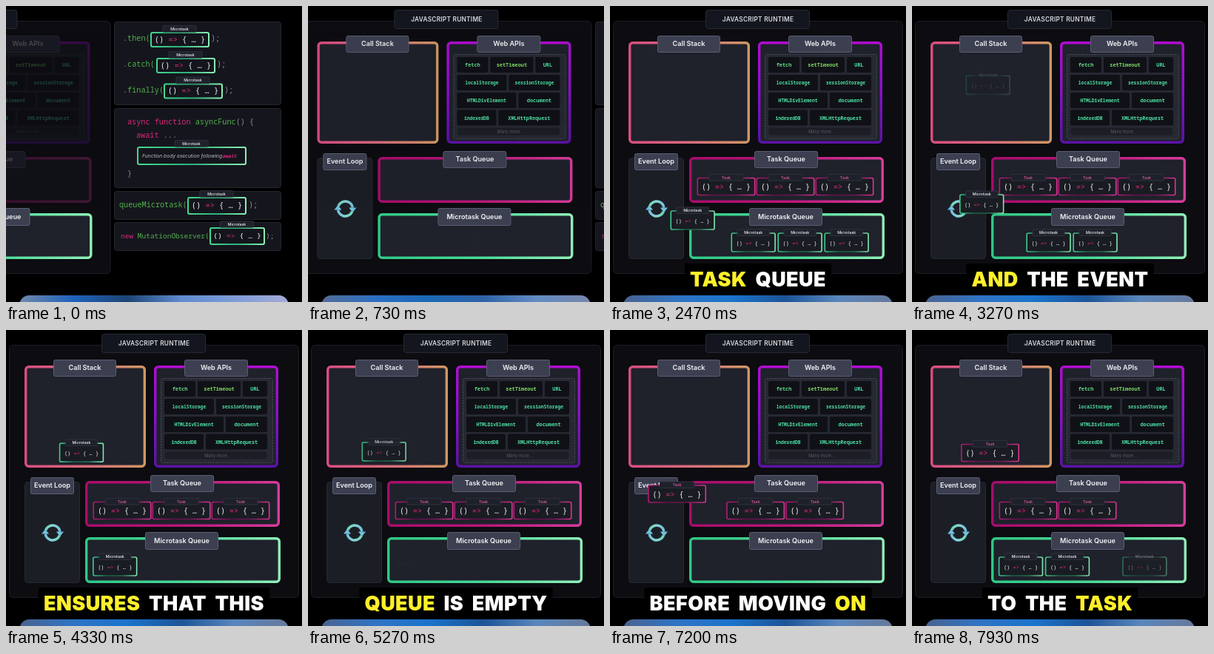
An HTML page with a canvas that plays this animation: 400x400 px, repeating every 8000 ms.

```html
<!DOCTYPE html>
<html lang="en">
<head>
<meta charset="utf-8">
<title>JavaScript runtime</title>
<style>
  html, body { margin: 0; height: 100%; overflow: hidden; background: #000; }
  canvas { display: block; width: 400px; height: 400px; }
</style>
</head>
<body>
<canvas id="stage"></canvas>
<script>
const canvas = document.getElementById('stage');
const ctx = canvas.getContext('2d');
const ratio = window.devicePixelRatio || 1;
canvas.width = canvas.height = 400 * ratio;

const LOOP = 8000;
const SANS = 'Inter, sans-serif';
const MONO = '"Noto Sans Mono", monospace';
const PINK = '#d8277c', GREEN = '#45d890', CODE = '#52b04c', WHITE = '#f2f3f5', GREY = '#8b8d94';

const clamp = v => Math.max(0, Math.min(1, v));
const phase = (t, start, length) => clamp((t - start) / length);
const ease = u => u < .5 ? 4 * u ** 3 : 1 - (2 - 2 * u) ** 3 / 2;
const lerp = (a, b, u) => a + (b - a) * u;
const bezier = (a, b, c, d, u) => {
  const v = 1 - u;
  return a * v ** 3 + 3 * b * v * v * u + 3 * c * v * u * u + d * u ** 3;
};

function gradient(x0, y0, x1, y1, colors) {
  const g = ctx.createLinearGradient(x0, y0, x1, y1);
  colors.forEach((c, i) => g.addColorStop(i / (colors.length - 1), c));
  return g;
}
const across = (x0, x1, colors) => gradient(x0, 0, x1, 0, colors);

// Rounded box given by its outer edges.
function box(x0, y0, x1, y1, fill, stroke, line = 1, radius = 3) {
  ctx.beginPath();
  ctx.roundRect(x0 + line / 2, y0 + line / 2, x1 - x0 - line, y1 - y0 - line, radius);
  ctx.fillStyle = fill;
  ctx.fill();
  if (!stroke) return;
  ctx.strokeStyle = stroke;
  ctx.lineWidth = line;
  ctx.stroke();
}

function text(str, x, y, font, color, align = 'center', spacing = 0) {
  ctx.font = font;
  ctx.letterSpacing = spacing + 'px';
  ctx.fillStyle = color;
  ctx.textAlign = align;
  ctx.textBaseline = 'alphabetic';
  ctx.fillText(str, x, y);
}

// Consecutive pieces of [text, color] on one line.
function runs(x, y, font, pieces) {
  for (const [str, color] of pieces) {
    text(str, x, y, font, color, 'left');
    x += ctx.measureText(str).width;
  }
}

function label(str, x0, y0, x1, y1) {
  box(x0, y0, x1, y1, '#3c3f50', '#5a5e73', 1, 2);
  text(str, (x0 + x1) / 2, (y0 + y1) / 2 + 2.8, `600 9.1px ${SANS}`, WHITE);
}

function region(x0, y0, x1, y1, stroke) {
  box(x0, y0, x1, y1, '#1f212b', stroke, 3.4, 4);
}

function tab(str, x, y, w, size, color) {
  box(x - w / 2, y - 4.7, x + w / 2, y + 4.7, '#1e212a', '#343844', .8, 1);
  text(str, x, y + size * .36, `500 ${size}px ${SANS}`, color);
}

function arrowFunction(x, y, size) {
  const font = `500 ${size}px ${MONO}`;
  ctx.font = font;
  ctx.letterSpacing = '0px';
  runs(x - ctx.measureText('() => { … }').width / 2, y + size * .33, font,
    [['() ', WHITE], ['=>', PINK], [' { … }', WHITE]]);
}

function card(kind, x, y, alpha = 1) {
  if (alpha <= 0) return;
  const task = kind === 'Task';
  const w = task ? 39.5 : 30.2, h = task ? 12.3 : 13.3;
  const colors = task
    ? ['#b41c76', '#5c1248', '#6e1654', '#de3596']
    : ['#3fd090', '#1c5a44', '#22694e', '#84ecb2'];
  ctx.save();
  ctx.globalAlpha = alpha;
  box(x - w, y - h, x + w, y + h, '#1a1c23', across(x - w, x + w, colors), 1.6, 2);
  tab(kind, x, y - h, task ? 47 : 44, 5.3, task ? '#e65aa4' : WHITE);
  arrowFunction(x, y + 1, task ? 10 : 7);
  ctx.restore();
}

function chip(str, x0, x1, y, size, color) {
  box(x0, y, x1, y + 21, '#101117', null, 0, 2);
  text(str, (x0 + x1) / 2, y + 13, `600 ${size}px ${MONO}`, color);
}

function webApis() {
  region(200, 48, 368, 186, gradient(0, 48, 0, 186, ['#b40cd4', '#8a10cc', '#5a12a4']));
  ctx.setLineDash([2, 1.5]);
  box(209, 65, 361, 180, '#262832', '#4c4f5a', 1, 2);
  ctx.setLineDash([]);
  const teal = '#4fe0a4';
  chip('fetch', 214, 256, 69, 6.9, '#62dc86');
  chip('setTimeout', 259, 317, 69, 6.9, '#7fd864');
  chip('URL', 320, 353, 69, 6.9, teal);
  chip('localStorage', 214, 281, 93, 6.3, teal);
  chip('sessionStorage', 284, 353, 93, 6.3, teal);
  chip('HTMLDivElement', 214, 294, 117, 6.3, teal);
  chip('document', 297, 353, 117, 6.9, teal);
  chip('indexedDB', 214, 267, 140.5, 6.3, teal);
  chip('XMLHttpRequest', 270, 353, 140.5, 6.8, teal);
  box(214, 164, 353, 175, '#1c1d25');
  text('Many more...', 286, 171.6, `400 5.8px ${SANS}`, '#595b65');
  label('Web APIs', 241, 40, 327, 63);
}

function loopIcon(x, y) {
  ctx.save();
  ctx.translate(x, y);
  ctx.strokeStyle = ctx.fillStyle = across(-14, 14, ['#5fd6a8', '#86d5d4', '#6cb6e0']);
  ctx.lineWidth = 3.5;
  for (let i = 0; i < 2; i++) {
    ctx.beginPath();
    ctx.arc(0, 0, 10, Math.PI * 1.12, Math.PI * 1.95);
    ctx.stroke();
    ctx.beginPath();
    ctx.moveTo(5, -1.5);
    ctx.lineTo(15, -1.5);
    ctx.lineTo(10, 5);
    ctx.fill();
    ctx.rotate(Math.PI);
  }
  ctx.restore();
}

function runtime(dim) {
  box(4, 20, 396, 362, '#0c0c11', '#1d1e25', 1, 5);
  box(129, 5, 270, 31, '#13161e', '#262a35', 1, 3);
  text('JAVASCRIPT RUNTIME', 200, 20.6, `600 8.3px ${SANS}`, '#d6d8de', 'center', .25);
  region(25, 48, 189, 186, across(25, 189, ['#da4c80', '#d86c7c', '#cf9862']));
  label('Call Stack', 64, 40, 149, 63);
  webApis();
  box(25, 205, 100, 342, '#1c1e26', '#282a33', 1, 4);
  label('Event Loop', 33, 199, 92, 222);
  loopIcon(63, 274);
  region(107, 204, 370, 266, across(107, 370, ['#a80c6c', '#b81678', '#d83c9c']));
  label('Task Queue', 195, 196, 281, 219);
  if (dim > 0) {
    ctx.fillStyle = `rgba(12,12,17,${.74 * dim})`;
    ctx.fillRect(6, 32, 388, 238);
  }
  region(107, 280, 371, 342, across(107, 371, ['#2fc886', '#48d896', '#90f0b8']));
  label('Microtask Queue', 188, 273, 287, 297);
}

function codeBox(x0, y0, x1, y1, size) {
  box(x0, y0, x1, y1, '#14151c', across(x0, x1, [GREEN, '#2bb07a', '#8df0b4']), 2, 2);
  tab('Microtask', (x0 + x1) / 2 - .5, y0 - 4, 46, 5.2, WHITE);
  if (size) arrowFunction((x0 + x1) / 2, y0 + (y1 - y0) / 2, size);
}

// Code panels to the right of the runtime, in their on-screen position.
function codePanels() {
  const font = `400 10.2px ${MONO}`;
  for (const [top, bottom] of [[21, 134], [138, 246], [250, 289], [292, 331]])
    box(146, top, 372, bottom, '#15161d', '#24262f', 1, 3);

  const calls = [['.then(', 195, 35], ['.catch(', 203, 70], ['.finally(', 213, 104.5]];
  for (const [name, x, y] of calls) {
    text(name, 158, y + 12, font, CODE, 'left');
    codeBox(x, y, x + 80, y + 21, 10.4);
    text(');', x + 82, y + 12, font, GREY, 'left');
  }

  runs(164, 160, font, [['async function ', PINK], ['asyncFunc', CODE], ['() {', GREY]]);
  runs(176, 177.5, font, [['await', PINK], [' ...', GREY]]);
  codeBox(177, 190, 325, 215);
  text('Function body execution following', 184, 205, `italic 400 6.7px ${SANS}`, '#b9bbc2', 'left');
  text('await', 292, 205, `italic 700 6.5px ${MONO}`, PINK, 'left');
  text('}', 164, 230, font, GREY, 'left');

  text('queueMicrotask(', 153, 272, font, CODE, 'left');
  codeBox(245, 258, 325, 282, 10.4);
  text(');', 328, 272, font, GREY, 'left');

  runs(155, 314, `400 9.5px ${MONO}`, [['new ', PINK], ['MutationObserver(', CODE]]);
  codeBox(275, 299, 350, 323, 9.8);
  text(');', 351, 314, `400 9.5px ${MONO}`, GREY, 'left');
}

const dispatches = [2190, 2945, 3700, 4455];
const TRAVEL = 700;
const TASK_START = 6850;

function tasks(t) {
  const p = ease(phase(t, TASK_START, TRAVEL));
  for (let i = 2; i > 0; i--) {
    const appear = ease(phase(t, 700 + 80 * i, 260));
    card('Task', 157 + 80 * (i - p), 244, appear);
  }
  card('Task', bezier(157, 110, 45, 105.5, p), bezier(244, 240, 215, 166, p),
    ease(phase(t, 700, 260)));
}

function microtasks(t) {
  const moves = dispatches.map(start => ease(phase(t, start, TRAVEL)));
  for (let i = 3; i >= 0; i--) {
    const appear = ease(phase(t, 700 + 70 * i, 260));
    const done = phase(t, dispatches[i] + 760, 400);
    const shifted = moves.slice(0, i).reduce((a, b) => a + b, 0);
    const start = 147 + 63 * (i - shifted) + 62 * (1 - appear);
    card('Microtask', bezier(start, 103, 41, 102.7, moves[i]),
      bezier(319.5, 290, 220, 165, moves[i]) - 60 * ease(done), appear * (1 - done));
  }
  for (let i = 0; i < 3; i++) {
    const u = phase(t, 7400 + 200 * i, 300);
    card('Microtask', 147 + 63 * i + 62 * (1 - ease(u)), 319.5, u);
  }
}

function emptySign(t) {
  ctx.save();
  ctx.globalAlpha = phase(t, 5250, 250) * (1 - phase(t, 6600, 250));
  box(111, 306, 160, 326, '#252731', '#2d303b', 1, 2);
  text('EMPTY!', 134.5, 318.4, `600 6.8px ${MONO}`, '#5c5f6a', 'center', .6);
  ctx.restore();
}

function bottomBar(t) {
  const settled = ['#4a6290', '#2f74c4', '#1a74cc', '#1c5498', '#5a86bc', '#66789a'];
  const opening = ['#7189ab', '#1f62bd', '#1c4474', '#5f8bd0', '#7e9cd8', '#a3abd6'];
  box(18, 391, 382, 430, across(18, 382, settled), null, 0, 14);
  ctx.save();
  ctx.globalAlpha = 1 - phase(t, 70, 900);
  box(18, 391, 382, 430, across(18, 382, opening), null, 0, 14);
  ctx.restore();
}

// Each caption: its words, then the time each word lights up.
const captions = [
  ['PRIORITY OVER THE', 930, 1600, 1850],
  ['TASK QUEUE', 2100, 2500],
  ['AND THE EVENT', 3100, 3400, 3500],
  ['LOOP', 3800],
  ['ENSURES THAT THIS', 4150, 4600, 4800],
  ['QUEUE IS EMPTY', 5000, 5350, 5550],
  ['BEFORE MOVING ON', 6200, 6650, 7050],
  ['TO THE TASK', 7350, 7500, 7650]
];

function caption(t) {
  const current = captions.filter(c => c[1] <= t).pop();
  if (!current) return;
  const [line, ...times] = current;
  const words = line.split(' ');
  const active = times.filter(s => s <= t).length - 1;
  const font = `900 27px ${SANS}`, gap = 11.5, spacing = .45;
  ctx.font = font;
  ctx.letterSpacing = spacing + 'px';
  const widths = words.map(w => ctx.measureText(w).width);
  const total = widths.reduce((a, b) => a + b, gap * (words.length - 1));
  let x = 200 - total / 2;
  box(x - 7, 348, x + total + 7, 387, '#000', null, 0, 1);
  words.forEach((word, i) => {
    text(word, x, 378.6, font, i === active ? '#fff02a' : '#fff', 'left', spacing);
    x += widths[i] + gap;
  });
}

function draw(t) {
  ctx.setTransform(ratio, 0, 0, ratio, 0, 0);
  ctx.fillStyle = '#000';
  ctx.fillRect(0, 0, 400, 400);
  const pan = ease(phase(t, 70, 860));
  ctx.save();
  ctx.translate(lerp(-254.5, 0, pan), 0);
  runtime(1 - pan);
  emptySign(t);
  tasks(t);
  microtasks(t);
  ctx.translate(254.5, 0);
  if (pan < 1) codePanels();
  ctx.restore();
  bottomBar(t);
  caption(t);
}

function frame() {
  draw(performance.now() % LOOP);
  requestAnimationFrame(frame);
}
frame();
</script>
</body>
</html>
```
